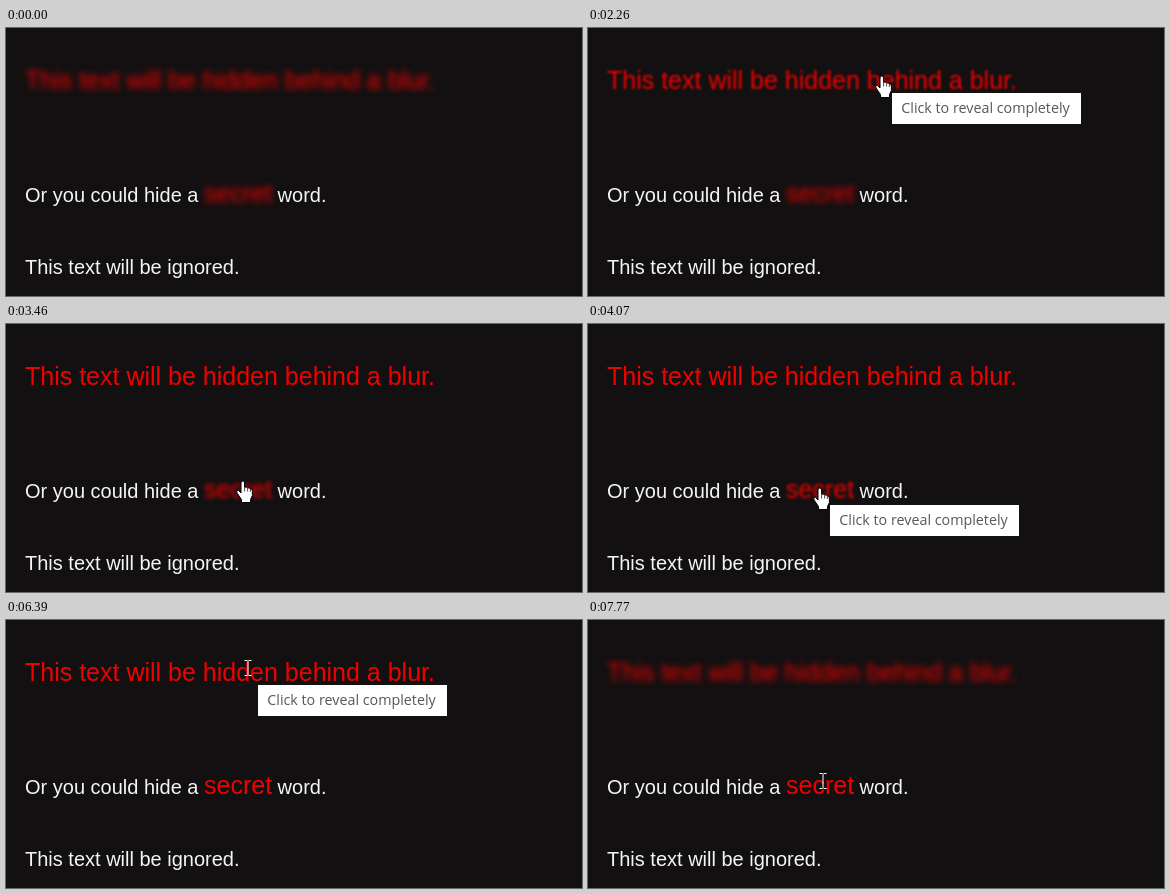
Animation, 576 px wide and 268 px high, one loop 8000 ms. Source, as an HTML page:

```html
<!DOCTYPE html>
<html lang="en">
<head>
<meta charset="utf-8">
<title>Blurred spoilers</title>
<style>
  html, body { margin: 0; width: 100%; height: 100%; overflow: hidden; background: #121011; }
  svg { display: block; width: 576px; height: 268px; }
  text { font-family: "Liberation Sans", Arial, sans-serif; font-size: 20px; fill: #f5f5f5; }
  .spoiler { font-size: 25px; fill: #f00000; }
  #tip text { font-family: "Open Sans", "Noto Sans", sans-serif; font-size: 14.3px; fill: #575757; }
  #tip rect { fill: #fff; }
  .pointer { fill: #fff; stroke: #000; stroke-width: 1; stroke-linejoin: round; }
</style>
</head>
<body>
<svg viewBox="0 0 576 268">
  <text id="title" class="spoiler" x="19" y="61">This text will be hidden behind a blur.</text>
  <text x="19" y="174">Or you could hide a</text>
  <text id="secret" class="spoiler" x="198" y="174">secret</text>
  <text x="271.6" y="174">word.</text>
  <text x="19" y="246">This text will be ignored.</text>
  <g id="tip">
    <rect x="11" y="17" width="189" height="31"/>
    <text x="20.3" y="37">Click to reveal completely</text>
  </g>
  <g id="cursor">
    <path id="arrow" class="pointer" d="M.5 .5V16.5L4.2 13L6.5 18.5L9 17.5L6.7 12H11.8Z"/>
    <g id="hand">
      <path class="pointer" d="M-1 2Q-1 0 .8 0Q2.6 0 2.6 2V6.3Q4.5 5.5 5.6 7Q7.3 6.2 8.3 8Q10.4 7.7 10.4 10V14.5L8.5 18.5V21.5H-.5V18.5L-5 12Q-6.3 9.2-3.6 9.3L-1 12Z"/>
      <path d="M2.6 6.5V10.5M5.6 7.3V10.5M8.3 8.3V11" fill="none" stroke="#000" stroke-width=".7"/>
    </g>
    <path id="beam" fill="none" stroke="#fff" d="M-2.5 -7.5H.5M1.5 -7.5H4.5M1 -7V7M-2.5 7.5H.5M1.5 7.5H4.5"/>
  </g>
</svg>
<script>
const LOOP = 8000;
const el = id => document.getElementById(id);
const linear = p => p;
const easeOut = p => 1 - (1 - p) * (1 - p);
const easeInOut = p => (1 - Math.cos(Math.PI * p)) / 2;

// Pointer moves: start, end, target x, target y, easing
const START = [463, 266];
const MOVES = [
  [760, 1520, 295, 49, easeOut],
  [1520, 1570, 293, 49, linear],
  [1740, 1750, 293, 48, linear],
  [3050, 3460, 236, 157, easeInOut],
  [3460, 3560, 231, 164, easeOut],
  [5350, 5370, 231, 154, linear],
  [5370, 5880, 241, 48, easeInOut],
  [6950, 7690, 235, 160, easeInOut],
  [7750, 7770, 234, 161, linear]
];

// Blur changes: start, end, target radius
const HIDDEN = 3;
const BLURS = {
  title: [[1270, 1515, 1.25], [2690, 2920, 0], [6440, 6700, HIDDEN]],
  secret: [[3360, 3560, 1.7], [4630, 4880, 0]]
};
const TIPS = [[2260, 2690], [4070, 4630], [6390, 6440]];

const within = (t, [a, b]) => t >= a && t < b;
const progress = (t, a, b) => Math.min(1, Math.max(0, (t - a) / (b - a)));

function pointerAt(t) {
  let [x, y] = START;
  for (const [a, b, tx, ty, ease] of MOVES) {
    if (t < a) break;
    const p = ease(progress(t, a, b));
    x += (tx - x) * p;
    y += (ty - y) * p;
  }
  return [Math.round(x), Math.round(y)];
}

function blurAt(t, steps) {
  let r = HIDDEN;
  for (const [a, b, target] of steps) {
    if (t < a) break;
    r += (target - r) * progress(t, a, b);
  }
  return r;
}

function pointerKind(t, x, y) {
  if (y < 70 && x < 430) return within(t, [2690, 6440]) ? "beam" : "hand";
  if (y > 149 && y < 180 && x > 197 && x < 267) return t >= 4630 ? "beam" : "hand";
  return "arrow";
}

const show = (id, on) => { el(id).style.display = on ? "" : "none"; };

function draw(t) {
  for (const id in BLURS) {
    const r = blurAt(t, BLURS[id]);
    el(id).style.filter = r > 0.02 ? `blur(${r.toFixed(3)}px)` : "none";
  }
  const [x, y] = pointerAt(t);
  const kind = pointerKind(t, x, y);
  const place = `translate(${x} ${y})`;
  el("cursor").setAttribute("transform", place);
  el("tip").setAttribute("transform", place);
  show("cursor", t >= 760);
  for (const id of ["arrow", "hand", "beam"]) show(id, id === kind);
  show("tip", TIPS.some(span => within(t, span)));
}

const begin = performance.now();
function tick() {
  draw((performance.now() - begin) % LOOP);
  requestAnimationFrame(tick);
}
tick();
</script>
</body>
</html>
```
